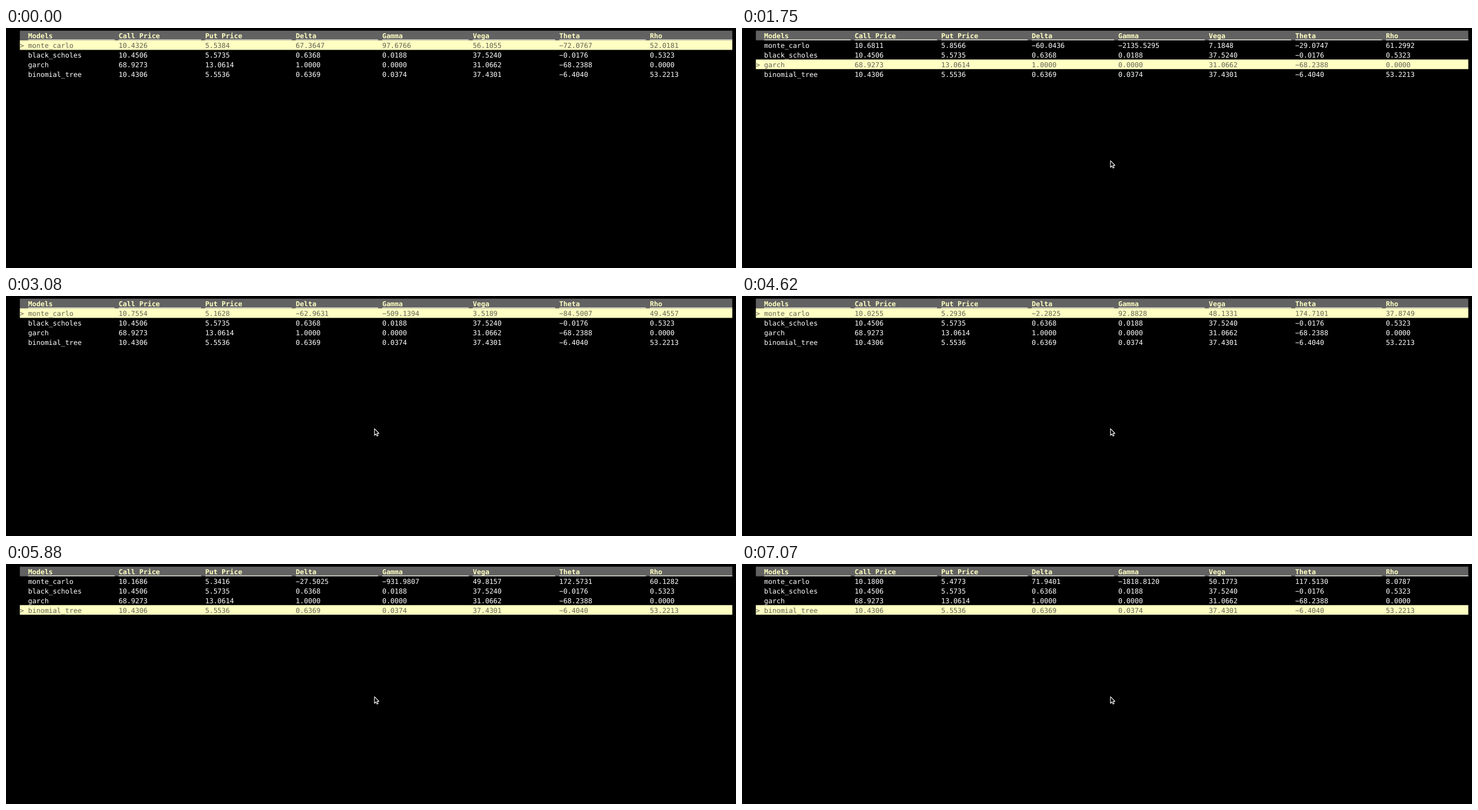
An HTML page that plays this animation: 1280x422 px, repeating every 8000 ms.

```html
<!DOCTYPE html>
<html lang="en">
<head>
<meta charset="utf-8">
<title>Option pricing models</title>
<style>
  html, body { margin: 0; width: 100%; height: 100%; overflow: hidden; background: #000; }
  svg { display: block; width: 1280px; height: 422px; }
  text {
    font: 12px "DejaVu Sans Mono", "Liberation Mono", monospace;
    fill: #fff;
    white-space: pre;
    text-rendering: geometricPrecision;
  }
  .head text { font-weight: bold; fill: #ffffc3; }
  .selected text { fill: #626252; }
  .bar { fill: #ffffc3; }
</style>
</head>
<body>
<svg id="stage" viewBox="0 0 1280 422"></svg>
<script>
const LOOP = 8000;
const LEFT = 24.3, RIGHT = 1273.5, TOP = 4.7;
const CHAR = 7.22, LINE = 16.9;
const CURSOR_AT = 560;

const HEADS = ["Models", "Call Price", "Put Price", "Delta", "Gamma", "Vega", "Theta", "Rho"];
const LAST = HEADS.length - 1;

// Bursts of key presses: start, interval, and the row selected by each press
const BURSTS = [
  [0, 70, "0000"], [490, 70, "122"], [910, 140, "10"], [1120, 0, "3"],
  [1750, 140, "2103"], [2730, 140, "210"], [3080, 0, "0"], [3920, 700, "10"],
  [4900, 280, "12"], [5530, 140, "10"], [5880, 0, "3"], [6650, 140, "2103"]
];

let seed = 17;
function random() {
  seed = (seed * 16807) % 2147483647;
  return seed / 2147483647;
}
const vary = (mean, spread) => mean + spread * (2 * random() - 1);

// One noisy Monte Carlo estimate of each price and Greek
const simulate = () => [
  vary(10.4, 0.4), vary(5.5, 0.4), vary(5, 80), vary(0, 2500),
  vary(33, 35), vary(40, 150), vary(45, 40)
];

const density = x => Math.exp(-x * x / 2) / Math.sqrt(2 * Math.PI);

// Normal distribution function, integrated with the midpoint rule
function normal(x, parts = 2000) {
  let sum = 0;
  for (let i = 0; i < parts; i++) sum += density(x * (i + 0.5) / parts);
  return 0.5 + sum * x / parts;
}

// Closed form for one year: theta per day, rho per percent
function blackScholes(spot, strike, rate, vol) {
  const d1 = (Math.log(spot / strike) + rate + vol * vol / 2) / vol;
  const d2 = d1 - vol;
  const paid = strike * Math.exp(-rate);
  const call = spot * normal(d1) - paid * normal(d2);
  const vega = spot * density(d1);
  return [
    call, call - spot + paid, normal(d1), density(d1) / (spot * vol), vega,
    -(vega * vol / 2 + rate * paid * normal(d2)) / 365, paid * normal(d2) / 100
  ];
}

const MODELS = [
  ["monte_carlo", simulate()],
  ["black_scholes", blackScholes(100, 100, 0.05, 0.2)],
  ["garch", [68.9273, 13.0614, 1, 0, 31.0662, -68.2388, 0]],
  ["binomial_tree", [10.4306, 5.5536, 0.6369, 0.0374, 37.4301, -6.404, 53.2213]]
];

const steps = BURSTS.flatMap(([start, gap, rows]) =>
  [...rows].map((row, i) => ({ time: start + i * gap, row: Number(row), values: simulate() })));

function add(parent, tag, attrs, content = "") {
  const node = document.createElementNS("http://www.w3.org/2000/svg", tag);
  for (const key in attrs) node.setAttribute(key, attrs[key]);
  node.textContent = content;
  return parent.appendChild(node);
}
const column = i => Math.round(2 + i * 151 / LAST);
const charX = n => LEFT + n * CHAR;
const lineY = n => TOP + n * LINE;
const baseline = n => 18 + n * 17;
const format = v => v.toFixed(4).replace("-", "\u2212");

const addCells = (parent, line, texts) => texts.map((text, i) =>
  add(parent, "text", { x: charX(column(i)), y: baseline(line) }, text));

const stage = document.getElementById("stage");
const width = RIGHT - LEFT;

const head = add(stage, "g", { class: "head" });
add(head, "rect", { x: LEFT, y: TOP, width, height: LINE, fill: "#626262" });
HEADS.forEach((_, i) => {
  const x = charX(column(i));
  const end = i < LAST ? charX(column(i + 1) - 1) : RIGHT;
  add(head, "rect", { x, y: 20.2, width: end - x, height: 1.2, fill: "#fffff0" });
});
addCells(head, 0, HEADS);

const rows = MODELS.map(([name, values], i) => {
  const line = i + 1;
  const group = add(stage, "g", {});
  const bar = add(group, "rect", { class: "bar", x: LEFT, y: lineY(line), width, height: LINE });
  const mark = add(group, "text", { x: LEFT, y: baseline(line) }, ">");
  const cells = addCells(group, line, [name, ...values.map(format)]);
  return { group, extras: [bar, mark], cells };
});

const cursor = add(stage, "path", {
  d: "M646.1 233.3V245L648.8 242.5L650.5 246.3L652.4 245.4L650.8 241.6H654Z",
  fill: "#000", stroke: "#fff", "stroke-width": 1.1, "stroke-linejoin": "round"
});

const show = (node, on) => node.setAttribute("visibility", on ? "visible" : "hidden");

let current = null;
function draw(time) {
  const step = steps.findLast(s => s.time <= time);
  if (step === current) return;
  current = step;
  rows.forEach(({ group, extras }, i) => {
    const selected = i === step.row;
    group.setAttribute("class", selected ? "selected" : "");
    extras.forEach(node => show(node, selected));
  });
  step.values.forEach((v, i) => { rows[0].cells[i + 1].textContent = format(v); });
  show(cursor, step.time >= CURSOR_AT);
}

const begin = performance.now();
function tick() {
  draw((performance.now() - begin) % LOOP);
  requestAnimationFrame(tick);
}
tick();
</script>
</body>
</html>
```
